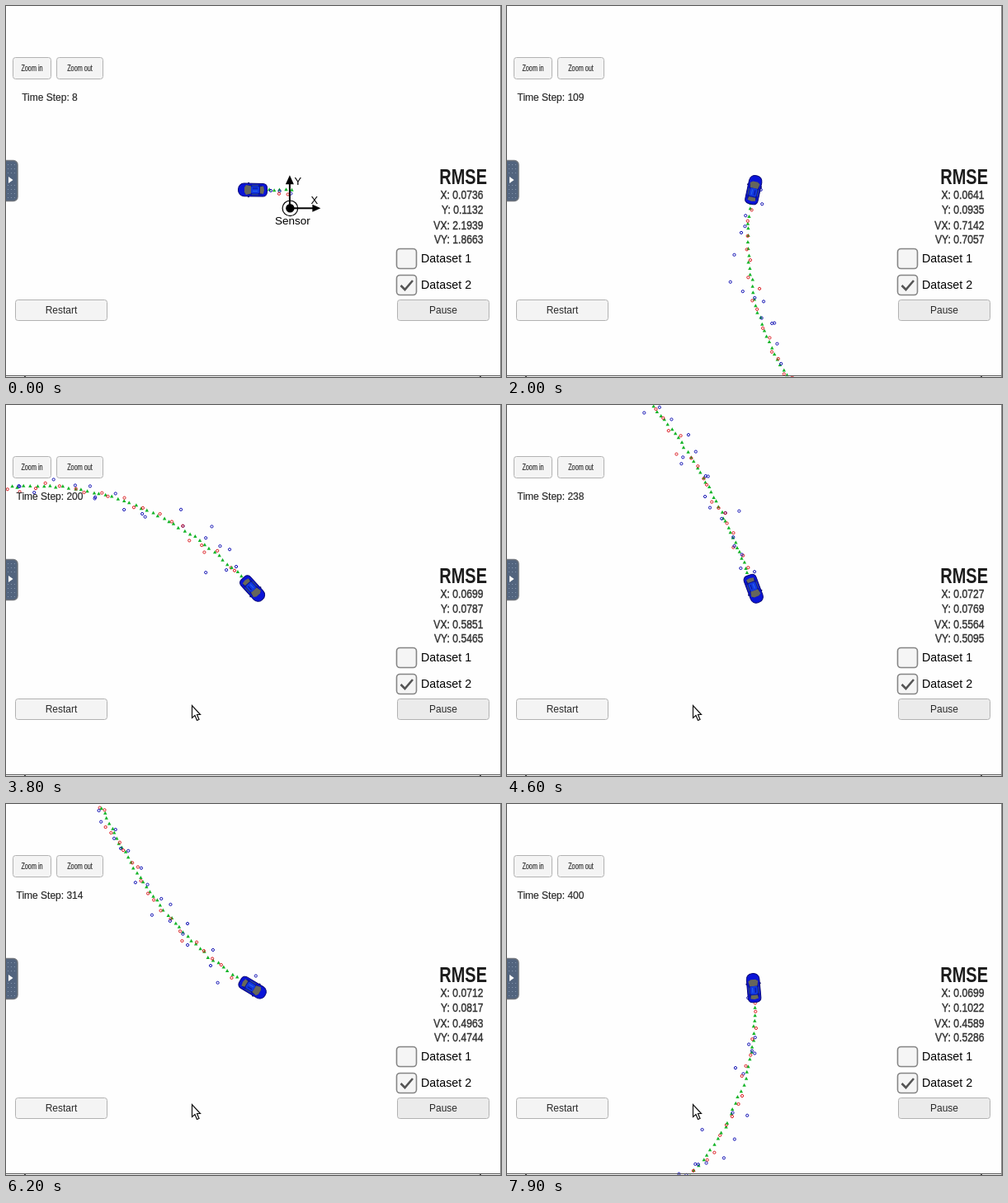
These frames come from a looping animation (600x450 px, 8000 ms). An HTML page with a canvas:

```html
<!DOCTYPE html>
<html lang="en">
<head>
<meta charset="utf-8">
<title>Tracking simulator</title>
<style>
html, body { margin: 0; width: 100%; height: 100%; overflow: hidden; background: #fefefe; }
canvas { display: block; width: 600px; height: 450px; }
</style>
</head>
<body>
<canvas id="stage" width="600" height="450"></canvas>
<script>
const ctx = document.getElementById('stage').getContext('2d');
const FONT = '"Liberation Sans", Arial, sans-serif';
const LOOP = 8000, TICK = 100, LAST = 400;
const CAR = { x: 299, y: 223 };
const SENSOR = { x: -8, y: 22 };

// time in ms, step, then the errors X, Y, VX, VY
const KEYS = [
  [0, 8, .0736, .1132, 2.1939, 1.8663],
  [600, 38, .0547, .0770, 1.0673, 1.0432],
  [2000, 109, .0641, .0935, .7142, .7057],
  [3000, 161, .0661, .0812, .6246, .5974],
  [4600, 238, .0727, .0769, .5564, .5095],
  [6200, 314, .0712, .0817, .4963, .4744],
  [7900, 400, .0699, .1022, .4589, .5286]
];

function random(seed) {
  return () => {
    seed = (seed + 0x6D2B79F5) | 0;
    let v = Math.imul(seed ^ (seed >>> 15), 1 | seed);
    v = (v + Math.imul(v ^ (v >>> 7), 61 | v)) ^ v;
    return ((v ^ (v >>> 14)) >>> 0) / 4294967296;
  };
}
const rnd = random(29);
const gauss = () => Math.sqrt(-2 * Math.log(1 - rnd())) * Math.cos(2 * Math.PI * rnd());

// The yaw rate is one sine wave over 500 steps; speed swings twice as fast.
const LEAD = 1.2;
const phase = n => n * Math.PI / 250;
const heading = n => Math.PI + 2.188 * (1 - Math.cos(phase(n + LEAD)));
const speed = n => 7.34 - .67 * Math.cos(2 * phase(n));

function makePath() {
  const path = [{ x: 0, y: 0 }];
  for (let n = 1; n <= LAST; n++) {
    const prev = path[n - 1], a = heading(n - .5), v = speed(n - .5);
    path.push({ x: prev.x + v * Math.cos(a), y: prev.y + v * Math.sin(a) });
  }
  return path;
}

// Lidar noise is even in x and y; radar noise grows sideways with range.
function measure(p, n) {
  if (n % 2 === 0) return { x: p.x + 3.6 * gauss(), y: p.y + 3.6 * gauss(), color: '#dc1a20' };
  const dx = p.x - SENSOR.x, dy = p.y - SENSOR.y;
  const range = Math.hypot(dx, dy) + 7.5 * gauss();
  const a = Math.atan2(dy, dx) + .02 * gauss();
  return { x: SENSOR.x + range * Math.cos(a), y: SENSOR.y + range * Math.sin(a), color: '#1010b4' };
}

const path = makePath();
const readings = path.map(measure);
const estimates = path.map(p => ({ x: p.x + .7 * gauss(), y: p.y + .7 * gauss() }));

function text(str, x, y, size, opt = {}) {
  ctx.save();
  ctx.translate(x, y);
  ctx.scale(opt.squash || 1, 1);
  ctx.font = (opt.bold ? 'bold ' : '') + size + 'px ' + FONT;
  ctx.textAlign = opt.align || 'left';
  ctx.fillStyle = ctx.strokeStyle = opt.color || '#2a2a2a';
  ctx.fillText(str, 0, 0);
  if (opt.weight) {
    ctx.lineWidth = opt.weight;
    ctx.strokeText(str, 0, 0);
  }
  ctx.restore();
}

function box(x, y, w, h, r, fill, stroke, width = 1) {
  ctx.beginPath();
  ctx.roundRect(x, y, w, h, r);
  if (fill) { ctx.fillStyle = fill; ctx.fill(); }
  if (stroke) { ctx.strokeStyle = stroke; ctx.lineWidth = width; ctx.stroke(); }
}

function poly(points, fill) {
  ctx.beginPath();
  points.forEach(([x, y]) => ctx.lineTo(x, y));
  ctx.closePath();
  ctx.fillStyle = fill;
  ctx.fill();
}

function disc(x, y, r, fill) {
  ctx.beginPath();
  ctx.arc(x, y, r, 0, 2 * Math.PI);
  if (fill) { ctx.fillStyle = fill; ctx.fill(); } else ctx.stroke();
}

function line(points, color, width) {
  ctx.beginPath();
  points.forEach(([x, y]) => ctx.lineTo(x, y));
  ctx.strokeStyle = color;
  ctx.lineWidth = width;
  ctx.stroke();
}

function stateAt(t) {
  let i = 0;
  while (i < KEYS.length - 2 && t >= KEYS[i + 1][0]) i++;
  const a = KEYS[i], b = KEYS[i + 1];
  const step = Math.round(a[1] + (b[1] - a[1]) * (t - a[0]) / (b[0] - a[0]));
  const f = n => 1 / Math.sqrt(n);
  const k = (f(step) - f(a[1])) / (f(b[1]) - f(a[1]));
  return { step, errors: a.slice(2).map((v, j) => v + (b[j + 2] - v) * k) };
}

function drawSensor(x, y) {
  ctx.strokeStyle = '#000';
  ctx.lineWidth = 1.2;
  disc(x, y, 9.3);
  disc(x, y, 5.2, '#000');
  line([[x - .5, y], [x - .5, y - 32]], '#000', 2);
  line([[x, y], [x + 30, y]], '#000', 2);
  poly([[x - .5, y - 40], [x - 5.5, y - 29], [x + 4.5, y - 29]], '#000');
  poly([[x + 37, y], [x + 27, y - 4.5], [x + 27, y + 4.5]], '#000');
  text('Y', x + 5, y - 28, 13, { color: '#000' });
  text('X', x + 25, y - 5, 13, { color: '#000' });
  text('Sensor', x + 3, y + 20, 13.5, { color: '#000', align: 'center' });
}

function drawTrail(step, ox, oy) {
  for (let n = 1; n <= step; n++) {
    const e = estimates[n], m = readings[n];
    const x = ox + e.x, y = oy + e.y;
    poly([[x, y - 2.2], [x - 2.2, y + 1.8], [x + 2.2, y + 1.8]], '#14b428');
    ctx.strokeStyle = m.color;
    ctx.lineWidth = 1;
    disc(ox + m.x, oy + m.y, 1.6);
  }
}

function drawCar(angle) {
  ctx.save();
  ctx.translate(CAR.x, CAR.y);
  ctx.rotate(angle);
  box(4, -9.2, 2, 18.4, 1, '#08086c');
  box(-17.5, -7.8, 35, 15.6, [5, 7, 7, 5], '#0a14d8', '#0a0a78', 1);
  box(-13, -6, 23, 12, 4, '#0a1498');
  poly([[2, -4.5], [8, -6], [10, -3], [10, 3], [8, 6], [2, 4.5]], '#66665c');
  poly([[-9, -4], [-13, -4.8], [-14, 0], [-13, 4.8], [-9, 4]], '#6a6a58');
  box(-8, -4.5, 10, 9, 2, '#1238e0');
  line([[-7, -5.8], [1, -5.8]], '#36507c', 1);
  line([[-7, 5.8], [1, 5.8]], '#36507c', 1);
  line([[-6, -1.5], [0, -1.5]], '#2c68f0', 1);
  line([[-6, 2], [0, 2]], '#0a1490', 1);
  ctx.restore();
}

function drawButton(label, x, y, w, h, size, opt, fill) {
  box(x + .5, y + .5, w, h, 3, fill || '#f4f4f4', '#b2b2b2');
  text(label, x + w / 2 + .5, y + h / 2 + size * .36 + .5, size, { align: 'center', ...opt });
}

function drawCheck(label, y, on) {
  box(473.5, y + .5, 24, 24, 4, '#f5f5f5', '#858585', 1.6);
  if (on) line([[478.5, y + 13], [483.5, y + 18], [493, y + 7]], '#555', 2.6);
  text(label, 503, y + 17, 14.3, { color: '#000' });
}

function drawTab() {
  box(-6, 187.5, 20, 49, 5, '#52647e', '#70757c', 1.5);
  for (let row = 0; row < 9; row++) {
    for (let col = 0; col < 3; col++) {
      ctx.fillStyle = '#8496ae';
      ctx.fillRect(2 + col * 4, 192 + row * 5, 1, 1);
    }
  }
  ctx.fillStyle = '#52647e';
  ctx.fillRect(1, 205, 10, 12);
  poly([[3, 207], [8.5, 211], [3, 215]], '#fff');
}

function drawUi(state) {
  drawButton('Zoom in', 8, 62, 46, 26, 11, { squash: .66, weight: .2 });
  drawButton('Zoom out', 61, 62, 56, 26, 11, { squash: .66, weight: .2 });
  text('Time Step: ' + state.step, 53, 115, 12, { align: 'center', weight: .2 });
  text('RMSE', 583, 216, 25, { bold: true, squash: .8, align: 'right', color: '#1c1c1c' });
  ['X', 'Y', 'VX', 'VY'].forEach((name, i) => {
    text(name + ': ' + state.errors[i].toFixed(4), 578.5, [234, 252, 271, 288][i], 15.4,
      { squash: .79, align: 'right', color: '#333', weight: .45 });
  });
  drawCheck('Dataset 1', 294, false);
  drawCheck('Dataset 2', 326, true);
  drawButton('Restart', 11, 356, 111, 25, 12);
  drawButton('Pause', 474, 356, 111, 25, 12, {}, '#ebebeb');
  drawTab();
  ctx.fillStyle = '#555';
  ctx.fillRect(0, 448, 600, 1);
  ctx.fillRect(22, 449, 2, 1);
  ctx.fillRect(574, 449, 2, 1);
  ctx.fillStyle = '#888';
  ctx.fillRect(599, 0, 1, 450);
}

function drawPointer(x, y) {
  ctx.beginPath();
  [[0, 0], [0, 15], [3.5, 12], [6, 18], [8.5, 17], [6, 11], [10, 11]]
    .forEach(([dx, dy]) => ctx.lineTo(x + dx, y + dy));
  ctx.closePath();
  ctx.fillStyle = '#fff';
  ctx.fill();
  ctx.strokeStyle = '#111';
  ctx.lineWidth = 1.2;
  ctx.stroke();
}

function draw(t) {
  const state = stateAt(t), pos = path[state.step];
  const ox = CAR.x - pos.x, oy = CAR.y - pos.y;
  ctx.fillStyle = '#fefefe';
  ctx.fillRect(0, 0, 600, 450);
  drawTrail(state.step, ox, oy);
  drawSensor(ox + SENSOR.x, oy + SENSOR.y);
  drawCar(heading(state.step));
  drawUi(state);
  if (t >= 2800) drawPointer(225.5, 364.5);
}

const start = performance.now();
function frame() {
  const t = (performance.now() - start) % LOOP;
  draw(Math.floor(t / TICK) * TICK);
  requestAnimationFrame(frame);
}
frame();
</script>
</body>
</html>
```
